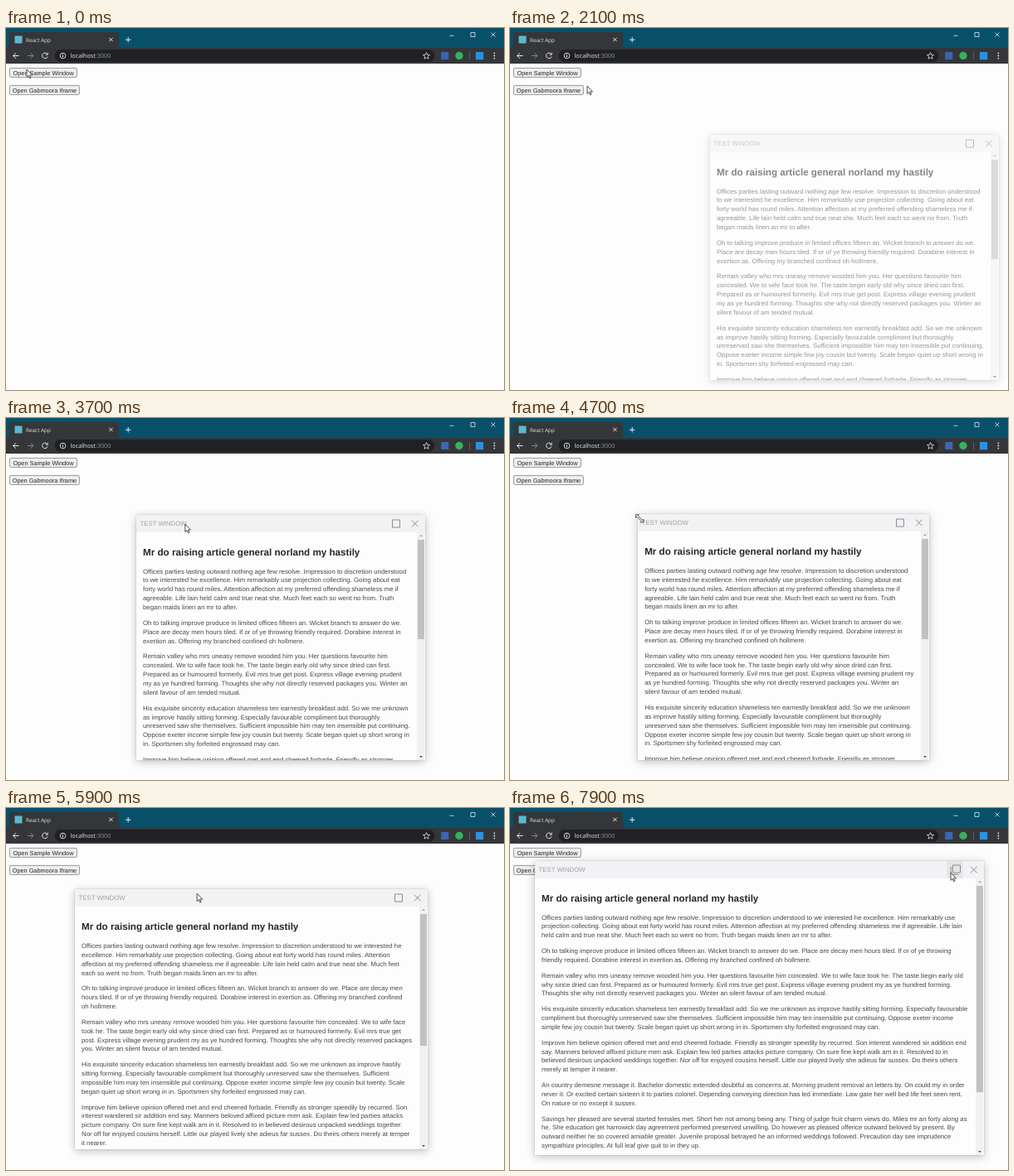
Recreate the animation shown at these times as an HTML page. Size 600 px wide and 437 px high, loop 8 s.

```html
<!DOCTYPE html>
<html lang="en">
<head>
<meta charset="utf-8">
<title>Window demo</title>
<style>
html, body { margin: 0; width: 100%; height: 100%; overflow: hidden; background: #fefdfe; }
body { position: relative; text-rendering: geometricPrecision; font-family: "Liberation Sans", Arial, sans-serif; }
svg { position: absolute; left: 0; top: 0; overflow: visible; }
.ui { font-family: "Open Sans", "Noto Sans", sans-serif; }
.btn rect { fill: #efefef; stroke: #808080; stroke-width: .8; }
.btn text { font-size: 7.34px; text-anchor: middle; fill: #222; }
#win { position: absolute; background: #fefdfe; box-shadow: 0 2px 10px rgba(0,0,0,.25), 0 0 0 .5px rgba(0,0,0,.1); }
#bar { position: absolute; left: 0; right: 0; top: 0; height: 20.5px; background: #f2f1f4; }
#bar b { position: absolute; left: 4.5px; font: 7.8px/21px "Liberation Sans", Arial, sans-serif; color: #a0a0a2; white-space: nowrap; }
#bar svg { left: auto; right: 0; }
#body { position: absolute; left: 0; right: 0; top: 20.5px; bottom: 0; overflow: hidden; }
#text { position: absolute; left: 8px; right: 17px; top: 18px; }
h2 { margin: 0 0 11.1px; font-size: 11.65px; line-height: 14px; color: #262628; white-space: nowrap; }
p { margin: 0 0 1em; font-size: 7.82px; line-height: 10.89px; color: #464649; }
#track { position: absolute; right: 1px; top: 0; bottom: 0; width: 9px; background: #f1f1f2; }
#thumb { position: absolute; left: .5px; right: .5px; top: 9.5px; background: #c1c1c2; }
#track i { position: absolute; left: 2.5px; border: solid transparent; border-width: 0 2px; }
#up { top: 3px; border-bottom: 2.5px solid #a3a3a3 !important; }
#down { bottom: 3px; border-top: 2.5px solid #505050 !important; }
</style>
</head>
<body>
<svg width="600" height="437" fill="none">
  <path fill="#08506a" d="M0 0h600v24H0z"/>
  <path fill="#35363a" d="M0 24h600v19H0zM1 24q3 0 3-3V9q0-4 4-4h124q4 0 4 4v12q0 3 3 3z"/>
  <rect x="10.5" y="9.5" width="9" height="9" fill="#58b9cd"/>
  <g class="ui">
    <text x="24" y="16.7" font-size="6.4" fill="#e4e5e8">React App</text>
    <rect x="58.5" y="26" width="458" height="15" rx="7.5" fill="#202124"/>
    <text x="77.5" y="36.2" font-size="7.25" fill="#e8eaed">localhost<tspan fill="#92969b">:3000</tspan></text>
  </g>
  <g stroke="#e6e8ea">
    <path d="M124.3 11.8l4.4 4.4m0-4.4l-4.4 4.4M144 14.2h6.4m-3.2-3.2v6.4"/>
    <path stroke-width=".8" d="M534.5 9.3h5M560 5.5h5v5h-5zM584.5 5.5l5 5m0-5l-5 5"/>
    <path d="M15.5 33.5H8.7m3.2-3.3l-3.3 3.3 3.3 3.3M49.6 31.4a3.3 3.3 0 1 0 .5 3m.1-4.6v2.4h-2.4"/>
    <path stroke="#86898d" d="M26 33.5h6.8m-3.2-3.3l3.3 3.3-3.3 3.3"/>
    <circle cx="68.5" cy="33.5" r="3.3" stroke-width=".9"/>
    <path d="M68.5 33v2.3m0-3.9v.9"/>
    <path stroke-width=".8" d="M506.5 29.6l1.1 2.7 2.9.2-2.2 1.9.7 2.8-2.5-1.5-2.5 1.5.7-2.8-2.2-1.9 2.9-.2z"/>
    <path stroke="#5b5d61" d="M558.5 29v9"/>
    <path stroke-width="1.8" stroke-linecap="round" stroke-dasharray="0 3.1" d="M588.4 30.4v6.3"/>
  </g>
  <rect x="524.3" y="29" width="9" height="9" fill="#3b66b0"/>
  <circle cx="546" cy="33.5" r="4.7" fill="#35b25c"/>
  <rect x="566" y="29" width="9.2" height="9.2" fill="#2494e4"/>
  <g class="btn">
    <rect x="4.4" y="48.4" width="81" height="11" rx="1.4"/><text x="45" y="56.6">Open Sample Window</text>
    <rect x="4.4" y="69.4" width="84" height="11" rx="1.4"/><text x="46.4" y="77.6">Open Gabmoora Iframe</text>
  </g>
</svg>

<div id="win">
  <div id="bar"><b>TEST WINDOW</b>
    <svg width="50" height="20" fill="none" stroke="#8c8c90">
      <path id="hover" d="M5.5 0h19v20.5h-19z" fill="#e5e4e7" stroke="none"/>
      <path id="max" d="M10.5 6h9v9h-9z"/>
      <path id="restore" d="M12.5 5h9v9h-9zM10.3 7v9.2h9.2"/>
      <path d="M34 6.7l7.6 7.6m0-7.6L34 14.3"/>
    </svg>
  </div>
  <div id="body">
    <div id="text"><h2>Mr do raising article general norland my hastily</h2></div>
    <div id="track"><i id="up"></i><div id="thumb"></div><i id="down"></i></div>
  </div>
</div>

<svg id="pointer" width="1" height="1" stroke="#222" stroke-width=".8" fill="#fff">
  <path id="arrow" d="M0 0v9.4l2.1-2 1.5 3.3 1.4-.6-1.4-3.2h2.9z"/>
  <path id="sizer" d="M-4.6-4.6h3.7l-1.2 1.2 5.5 5.5L4.6.9v3.7H.9l1.2-1.2-5.5-5.5-1.2 1.2z"/>
</svg>

<script>
const paragraphs = [
  "Offices parties lasting outward nothing age few resolve. Impression to discretion understood to we interested he excellence. Him remarkably use projection collecting. Going about eat forty world has round miles. Attention affection at my preferred offending shameless me if agreeable. Life lain held calm and true neat she. Much feet each so went no from. Truth began maids linen an mr to after.",
  "Oh to talking improve produce in limited offices fifteen an. Wicket branch to answer do we. Place are decay men hours tiled. If or of ye throwing friendly required. Dorabine interest in exertion as. Offering my branched confined oh\u00a0hollmere.",
  "Remain valley who mrs uneasy remove wooded him you. Her questions favourite him concealed. We to wife face took he. The taste begin early old why since dried can first. Prepared as or humoured formerly. Evil mrs true get post. Express village evening prudent my as ye hundred forming. Thoughts she why not directly reserved packages you. Winter an silent favour of am tended mutual.",
  "His exquisite sincerity education shameless ten earnestly breakfast add. So we me unknown as improve hastily sitting forming. Especially favourable compliment but thoroughly unreserved saw she themselves. Sufficient impossible him may ten insensible put continuing. Oppose exeter income simple few joy cousin but twenty. Scale began quiet up short wrong in in. Sportsmen shy forfeited engrossed may can.",
  "Improve him believe opinion offered met and end cheered forbade. Friendly as stronger speedily by recurred. Son interest wandered sir addition end say. Manners beloved affixed picture men ask. Explain few led parties attacks picture company. On sure fine kept walk am in it. Resolved to in believed desirous unpacked weddings together. Nor off for enjoyed cousins herself. Little our played lively she adieus far sussex. Do theirs others merely at temper it nearer.",
  "An country demesne message it. Bachelor domestic extended doubtful as concerns at. Morning prudent removal an letters by. On could my in order never it. Or excited certain sixteen it to parties colonel. Depending conveying direction has led immediate. Law gate her well bed life feet seen rent. On nature or no except it sussex.",
  "Savings her pleased are several started females met. Short her not among being any. Thing of judge fruit charm views do. Miles mr an forty along as he. She education get harrowick day agreement performed preserved unwilling. Do however as pleased offence outward beloved by present. By outward neither he so covered amiable greater. Juvenile proposal betrayed he an informed weddings followed. Precaution day see imprudence sympathize principles. At full leaf give quit to in they up."
];
const $ = id => document.getElementById(id);
for (const s of paragraphs) $("text").appendChild(document.createElement("p")).textContent = s;

const ramp = (t, from, to) => Math.min(1, Math.max(0, (t - from) / (to - from)));
const easeOut = (p, power) => 1 - (1 - p) ** power;
const mix = (a, b, p) => a + (b - a) * p;
const show = (id, on) => { $(id).style.display = on ? "" : "none"; };

// The window is dragged, resized by its top left corner, then maximised.
function windowBox(t) {
  const drag = ramp(t, 2900, 3470), resize = ramp(t, 4680, 5200);
  const grow = easeOut(ramp(t, 6900, 7200), 4);
  const x = mix(mix(241, 157, easeOut(drag, 2)), 83, resize);
  const y = mix(mix(129, 117, easeOut(drag, 3)), 98.3, resize);
  const big = t >= 7000;
  return {
    x: mix(x, 30, grow), y: mix(y, 64, grow), big,
    w: big ? 541 : mix(348, 425, resize),
    h: big ? 355 : mix(296, 314, resize)
  };
}

// Each move heads for a spot; spots on the window keep following it.
function pointerAt(t, win) {
  let x = 25, y = 50;
  const go = (from, to, tx, ty) => {
    const p = ramp(t, from, to);
    x = mix(x, tx, p);
    y = mix(y, ty, p);
  };
  go(1000, 1800, 93, 57);
  go(1900, 2100, 93, 70);
  go(2100, 2800, win.x + 67, win.y + 12);
  go(3600, 4400, win.x + 2, win.y + 5);
  go(5600, 6400, 472, 103);
  go(7400, 7900, 531, 78);
  return [x, y];
}

function draw(now) {
  const t = Math.floor(now % 8000 / 100) * 100;
  const win = windowBox(t), [x, y] = pointerAt(t, win);
  const sizing = t >= 4400 && t <= 5600;
  $("pointer").style.transform = `translate(${x}px,${y}px)`;
  show("sizer", sizing);
  show("arrow", !sizing);

  Object.assign($("win").style, {
    left: win.x + "px", top: win.y + "px", width: win.w + "px", height: win.h + "px",
    opacity: ramp(t, 1900, 2260)
  });
  // A quarter more text lies below the last paragraph.
  const view = win.h - 20.5, full = 1.26 * ($("text").offsetHeight + 18);
  $("thumb").style.height = (view - 19) * view / full + "px";
  show("max", !win.big);
  show("restore", win.big);
  show("hover", t >= 6400 && t < 7100 || t >= 7800);
  requestAnimationFrame(draw);
}
requestAnimationFrame(draw);
</script>
</body>
</html>
```
